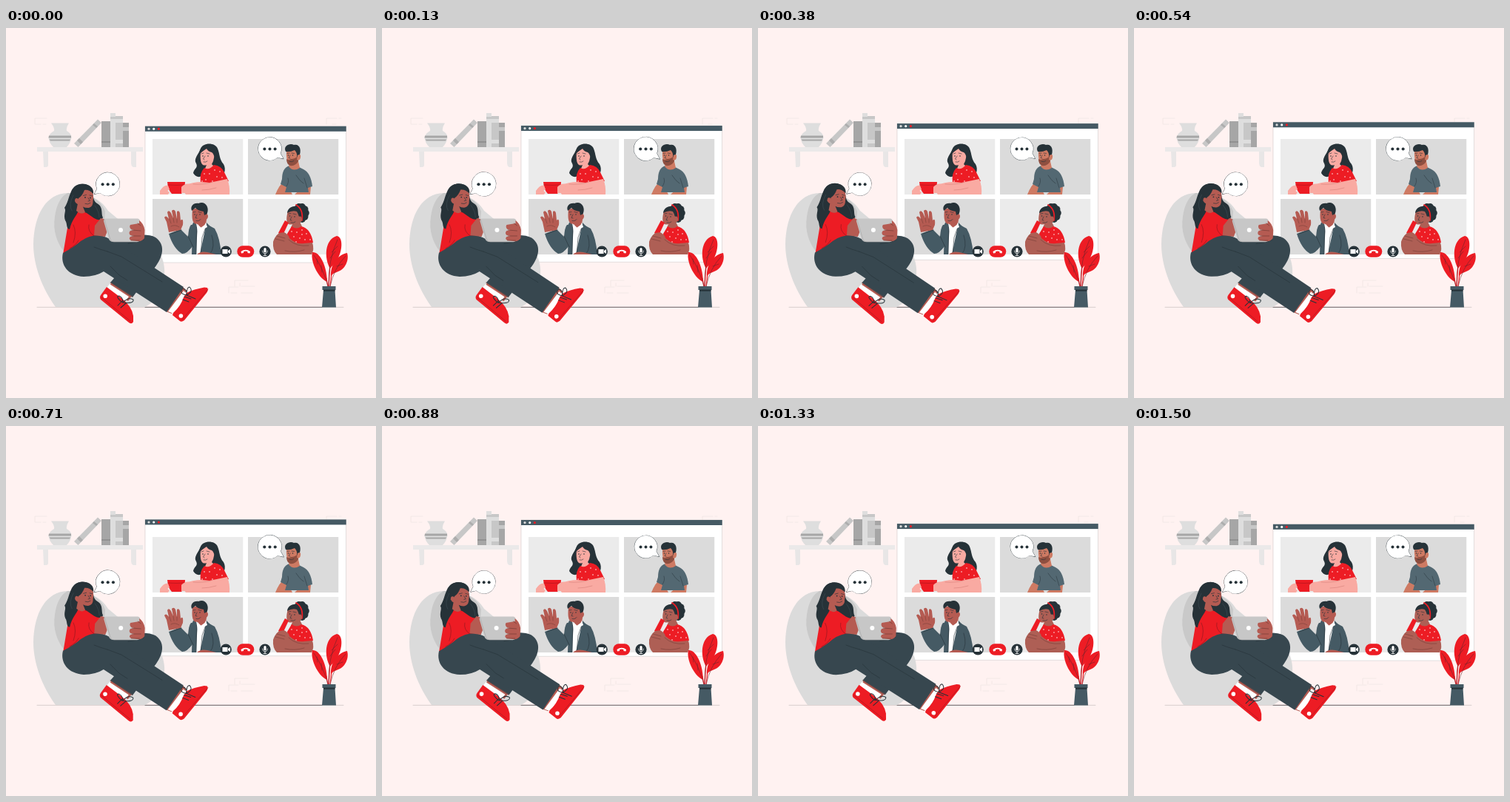
These frames come from a looping animation (500 px wide and 500 px high, 1.54 s). An HTML page with a canvas:

```html
<!DOCTYPE html>
<html lang="en">
<head>
<meta charset="utf-8">
<title>Video call</title>
<style>
html, body { margin: 0; width: 100%; height: 100%; overflow: hidden; background: #fff2f1; }
canvas { display: block; width: 100vw; height: 100vh; }
</style>
</head>
<body>
<canvas></canvas>
<script>
const LOOP = 1540;
const INK = '#263238', SLATE = '#455a64', PANTS = '#37474f', RED = '#ed1c24', WHITE = '#fff';
const SKIN = '#b55b52', PINK = '#f9aaa2', TAN = '#ce7a63', DEEP = '#ae5f55', CREASE = '#713a34';
const canvas = document.querySelector('canvas');
const ctx = canvas.getContext('2d');
const ratio = window.devicePixelRatio || 1;
canvas.width = canvas.height = 500 * ratio;

const paths = new Map();
function path(d) {
  if (!paths.has(d)) paths.set(d, new Path2D(d));
  return paths.get(d);
}
function fill(d, color) {
  ctx.fillStyle = color;
  ctx.fill(path(d));
}
function line(d, color = INK, width = 0.7) {
  ctx.strokeStyle = color;
  ctx.lineWidth = width;
  ctx.stroke(path(d));
}
function box(x, y, w, h, color) {
  ctx.fillStyle = color;
  ctx.fillRect(x, y, w, h);
}
function dot(x, y, r, color) {
  ctx.fillStyle = color;
  ctx.beginPath();
  ctx.arc(x, y, r, 0, Math.PI * 2);
  ctx.fill();
}
function at(x, y, draw, angle = 0, px = 0, py = 0) {
  ctx.save();
  ctx.translate(px + x, py + y);
  ctx.rotate(angle);
  ctx.translate(-px, -py);
  draw();
  ctx.restore();
}
function pane(x, y, color, draw) {
  ctx.save();
  ctx.beginPath();
  ctx.rect(x, y, 122.5, 75);
  ctx.clip();
  box(x, y, 122.5, 75, color);
  draw();
  ctx.restore();
}
function speckle(points) {
  for (const [x, y] of points) dot(x, y, 0.75, WHITE);
}

function backdrop() {
  box(0, 0, 500, 500, '#fff2f1');
  line('M55 122H39V130H47 M50 130H54 M433 130V122H447 M450 122H453 M441 130H446', '#efe5e4', 0.8);
  line('M309 349V341H327 M318 349H336 M301 358V350H314 M304 358H312 M318 358H333 M316 345V349', '#efe5e4', 0.8);
  line('M42 377.3H456', '#b9b2b2', 0.6);
  line('M188 377.3H427', '#514f51', 0.8);
}

function shelf() {
  fill('M50 166H57V185Q57 188 54 188H51Z M169 166H176V188H172Q169 187 169 182Z', '#e8e6e6');
  box(42, 161, 143, 6, '#ebe9e9');
  fill('M61 128.5H85Q81 135 82 139Q88 142 88.5 148Q87 156 82 161H64Q58 155 57.5 148Q59 142 65 139Q66 135 61 128.5Z', '#dedede');
  fill('M58 145.5H88L88 148.5H57.5Z M58.5 150.5H87L86 152.5H60Z', '#a6a6a6');
  fill('M92 156L124 123.5L129 128L97.5 161Z', '#c7c7c7');
  fill('M96 152L99 149L104 154L101 157Z M117 131L119 129L124 133L122 135Z', '#adadad');
  box(129, 126, 12, 35, '#a6a6a6');
  box(141, 115, 7, 46, '#dedede');
  box(148, 119, 10, 42, '#c7c7c7');
  box(158, 128, 8, 33, '#a6a6a6');
  box(141, 120, 7, 3, '#c7c7c7');
  box(148, 123, 10, 5, '#dedede');
  box(148, 151, 10, 5, '#dedede');
  box(158, 134, 8, 5, '#c7c7c7');
  box(129, 153, 12, 2, '#919191');
}

function browser(lift) {
  const y = 132.8 - lift;
  box(188.3, y, 271.2, 184.3, WHITE);
  ctx.strokeStyle = '#cfcccc';
  ctx.lineWidth = 0.6;
  ctx.strokeRect(188.3, y, 271.2, 184.3);
  box(188, y, 271.7, 7, SLATE);
  ['#dbdbdb', WHITE, RED].forEach((c, i) => dot(193 + i * 6.7, y + 3.6, 1.6, c));
}

function bowlWoman() {
  fill('M263 163C266 155 282 154 286 163C289 170 288 177 294 184C298 191 295 200 288 205L267 195C265 204 256 202 253 196C254 190 260 189 257 183C253 177 260 171 263 163Z', INK);
  fill('M263 167Q268 161 278 164L282 171L280 180L278 184L283 189Q276 196 269 190L271 185C263 188 262 178 263 167Z', PINK);
  fill('M261 171C261 159 274 153 282 160Q288 170 282 177Q281 170 278 168Q273 167 271 163Q266 166 261 171Z', INK);
  fill('M268 189Q274 193 281 185Q291 186 295 195L301 207L277 212L263 210Q261 196 268 189Z', RED);
  fill('M275 209L299 204Q303 214 302 225H243Q238 220 241 213Q252 208 264 208Z', PINK);
  line('M277 209Q267 212 253 211M265 219Q274 219 284 216', '#cf7771', 0.5);
  fill('M218 208H242Q242 219 237 224H224Q219 219 218 208Z', RED);
  line('M219 212Q230 213 241 212', '#a9141b', 0.6);
  fill('M208 220Q214 211 219 213L221 218Q216 220 221 222L219 225H208Z', PINK);
  fill('M237 215Q242 209 249 211L247 216L246 218L245 223H237Z', PINK);
  speckle([[268, 197], [275, 197], [282, 192], [289, 194], [285, 201], [270, 205], [279, 207], [292, 202], [265, 207]]);
  dot(266, 173, 0.8, INK);
  dot(273, 173, 0.8, INK);
  line('M264 170L267 169M271 169L275 170M269 173L266.5 177L268 178M267 181Q270 182 272 180', INK, 0.6);
}

function beardMan() {
  fill('M364 225Q369 212 377 206L387 225Z M403 213L412 215L411 225H390Z', TAN);
  fill('M383 186Q373 189 373 204L371 211L379 215L377 222H409L408 216L414 214Q412 196 402 191L394 187Z', '#536872');
  line('M379 214Q383 208 381 203M403 203L407 216M392 199Q397 207 402 210', INK, 0.5);
  fill('M379 166Q387 161 396 168L395 180L397 189Q388 195 382 187L383 184Q378 180 379 166Z', TAN);
  fill('M379 177Q382 179 385 177Q391 177 394 173L395 180Q391 187 384 186Q379 184 379 177Z', '#8f4f40');
  fill('M378 167C374 159 384 155 389 158C397 156 400 165 396 174L393 174Q394 169 390 165Q384 168 378 167Z', INK);
  fill('M394 172Q399 169 398 175Q397 180 393 178Z', TAN);
  dot(381.5, 172, 0.75, INK);
  dot(387.5, 172, 0.75, INK);
  line('M380 169.5L383 169M386 169L389.5 169.5M384 172L382 175.5L384 176M383 180.5Q387 181.5 389 179.5', INK, 0.6);
}

function wavingMan() {
  fill('M250 266Q247 269 246 282L236 272L220 278Q226 298 238 305Q245 305 252 295L253 306H291Q289 283 282 271L269 264Z', SLATE);
  fill('M220 276L217 262L214 256Q216 252 220 258L218 249Q220 245 223 250L226 257L224 247Q227 244 229 248L231 258L231 248Q234 246 235 250L236 260Q240 256 239 266L236 273Z', SKIN);
  line('M221 258L223 264M226 257L227 263M231 258V263M223 268Q228 265 234 269', CREASE, 0.5);
  fill('M258 262L271 264L268 280L264 306H253L257 279Z', WHITE);
  fill('M253 263L259 261L257 306H251Q252 285 250 270Z M271 263L278 270Q270 284 266 306H262Z', SLATE);
  line('M258 266Q257 286 257 306M271 266L265 283L263 306M278 280Q283 296 276 305M246 281L253 296M237 273L223 278', INK, 0.6);
  fill('M252 245Q261 241 272 247L271 259L270 265L263 270L259 265C251 266 251 255 252 245Z', SKIN);
  fill('M251 247C248 239 256 236 260 237C269 233 275 242 272 250L270 254L268 253L267 248Q259 247 256 243Z', INK);
  fill('M268 253Q273 249 273 255Q272 260 268 259Z', SKIN);
  fill('M257 264L264 270L259 275Z M270 263L272 269L265 273Z', WHITE);
  fill('M258 306Q263 301 272 303L284 306Z', SKIN);
  dot(255, 252, 0.75, INK);
  dot(262, 252, 0.75, INK);
  line('M253 249L256 248.5M260 248.5L264 249.5M258 252L256 256.5L258 257M257 260.5Q261 261.5 263 258.5', INK, 0.6);
}

function curlyWoman() {
  for (let i = 0; i < 10; i++) {
    const a = i * Math.PI / 5;
    dot(398 + 7 * Math.cos(a), 250 + 8.5 * Math.sin(a), 4.8, INK);
  }
  box(393, 243, 10, 14, INK);
  fill('M381 247Q388 242 395 248L397 262L400 268Q392 276 385 270L387 265C378 268 378 258 381 247Z', DEEP);
  fill('M380 250C381 241 392 237 398 246Q401 258 397 263Q397 254 393 248Q387 246 380 250Z', INK);
  line('M392 239Q402 245 400 260', RED, 1.8);
  fill('M395 255Q400 253 400 259Q399 264 395 262Z', DEEP);
  fill('M386 268Q393 273 399 268Q412 271 415 290L403 293L381 291L380 278Z', RED);
  speckle([[386, 275], [393, 276], [400, 273], [406, 278], [389, 282], [397, 284], [404, 286], [411, 286], [385, 287], [392, 289], [400, 279]]);
  fill('M377 260L382 263L374 280L368 277Z', RED);
  fill('M403 291L414 290Q417 299 413 306H366Q360 300 361 289Q363 282 369 277L376 276Q382 279 383 284Q393 293 403 291Z', DEEP);
  line('M366 281L377 284M364 285L376 288M382 286Q392 296 409 294M377 301Q390 304 403 300', CREASE, 0.55);
  dot(383.5, 254, 0.75, INK);
  dot(390, 255, 0.75, INK);
  line('M382 251L385 250.5M388 251L392 252M386 255L384 259.5L386 260M385 263Q389 264 391 262', INK, 0.6);
}

function controls() {
  dot(297.2, 302, 7.6, INK);
  fill('M292.5 299H299.5V305H292.5Z M300 301L303 299V305L300 303Z', WHITE);
  ctx.fillStyle = RED;
  ctx.beginPath();
  ctx.roundRect(312.3, 294.3, 23, 15.4, 7.7);
  ctx.fill();
  fill('M317.5 302Q324 297.5 330 302L329.5 304.5L326.5 304L326.4 302Q324 301.2 321.2 302L321 304L318 304.5Z', WHITE);
  dot(350, 302, 7.6, INK);
  line('M350 298.5V302', WHITE, 3.2);
  line('M346.8 301Q347 305 350 305Q353 305 353.2 301M350 305V307.5M348 307.5H352', WHITE, 0.8);
}

function chair() {
  fill('M67 377C49 352 37 321 37 292C38 252 54 224 83 223C109 223 127 229 138 247L180 282C207 291 216 315 214 334C211 356 202 370 188 377Z', '#dbdbdb');
  fill('M83 223C109 223 127 229 134 248L130 300L84 309C68 292 63 273 66 255C68 239 74 228 83 223Z', '#c9c9c9');
}

function shoes() {
  fill('M143 343L171 361L165 369L137 354Z M239 350L244 355L224 386L216 383Z', SKIN);
  fill('M140 346L166 363L160 371L134 354Z M240 355L245 360L229 387L219 383Z', WHITE);
  fill('M136 350L156 365Q170 376 172 389L172 397Q170 401 166 398L128 367Q126 364 128 361Z', RED);
  fill('M226 385Q236 376 240 364L244 358Q254 353 268 350.5L272 351Q274 354 271 358L241 395Q237 398 235 396L225 388Z', RED);
  line('M129 364L168 396M273 353L238 394', '#a3161d', 0.6);
  dot(134.2, 362.2, 2.8, WHITE);
  dot(236.4, 389, 2.8, WHITE);
  line('M151 375L158 368M155 378L162 372M157 371Q147 362 153 362Q158 364 158 371Q165 363 172 367Q173 373 158 371', INK, 1);
  line('M241 363L250 366M239 367L247 370M244 361Q233 359 239 352Q245 353 244 361Q244 350 248 350Q254 356 244 361M244 361L256 366', INK, 1);
}

function legs() {
  shoes();
  fill('M134 286C158 283 188 275 202 283C215 292 213 307 203 321L171 364L141 344L166 315L133 301Z', PANTS);
  line('M141 344L171 363', '#8b4a40', 0.7);
  fill('M77 304Q92 296 101 288Q112 280 126 280Q136 282 147 289L240 350L217 384L132 329Q121 336 105 336C84 335 73 320 77 304Z', PANTS);
  line('M137 302L156 309L211 343M137 302Q126 299 119 296M165 291Q176 290 186 286M141 322L153 334L164 341', INK, 0.6);
}

function torso() {
  fill('M97 247Q87 250 84 264L77 306L104 292L126 284L122 270L134 262Q124 248 108 248Z', RED);
  line('M91 266Q96 276 91 290M112 266Q110 275 119 281M86 298Q94 294 98 287', '#8f1820', 0.65);
}

function head() {
  fill('M88 221C93 208 112 207 116 219C119 228 117 233 123 237C132 242 128 250 131 256Q128 262 119 257L109 250L98 246C96 254 89 258 86 272C81 272 83 263 80 260C77 252 82 247 79 243C84 235 84 230 88 221Z', INK);
  fill('M97 222Q106 215 116 220Q119 226 117.5 234Q118 241 112 243Q107 243.5 104 241.5L107 249Q101 253 95 247L97 237Q92 236 93 230Z', SKIN);
  fill('M90 237C84 218 95 210 104 211C114 211 119 217 118 224Q112 218 106 219Q103 227 98 230L97 237Z', INK);
  fill('M98 231Q93 228 93 234Q95 239 100 238Z', SKIN);
  dot(107, 229, 0.9, INK);
  dot(114, 229.5, 0.9, INK);
  line('M104.5 226.5L108.5 225.5M113 226L116.5 227M111 229.5L113.5 233.5L111 234M107 237.5Q111 239 114 236.5', INK, 0.65);
  line('M91 226Q84 239 89 247M120 240Q126 248 126 256', '#43535b', 0.5);
}

function tablet() {
  fill('M120 267L128 257L135 259L138 272L134 282L119 280Z', SKIN);
  fill('M134 257.5H178Q181 258 181 261L182 285Q181 289 177 289H144Q140 288 139 285L132 261Q132 258 134 257.5Z', '#c7c7c7');
  line('M133 259L141 286Q142 289 146 289H177', '#a5a5a5', 0.6);
  dot(155, 273, 3, WHITE);
  fill('M180 260Q186 264 187.5 273L187 284Q184 289 177 288L169 287Q165 285 168 282L173 281L168 280Q165 277 168 274L173 273L169 272Q166 269 168 266L180 264Z', SKIN);
  line('M170 273L182 274M170 281L182 281M169 287L180 287M178 264L182 267', CREASE, 0.65);
}

function bubble(x, y, r, side, scale) {
  ctx.save();
  ctx.translate(x, y);
  ctx.scale(scale * side, scale);
  ctx.strokeStyle = INK;
  ctx.fillStyle = WHITE;
  ctx.lineWidth = 0.8;
  ctx.beginPath();
  ctx.arc(0, 0, r, 0.85, 0.4 + Math.PI * 2);
  ctx.lineTo(18, 13);
  ctx.closePath();
  ctx.stroke();
  ctx.fill();
  for (const dx of [-7, 0, 7]) dot(dx, 0.2, 2, INK);
  ctx.restore();
}

function plant() {
  line('M433 338L435 349M438 320L436 349M440 332L438 349', RED, 1.2);
  fill('M434 343C420 337 411 313 414 303C423 302 433 318 434 343Z', RED);
  fill('M438 325C430 312 430 286 447 281C456 282 455 302 447 314C443 320 440 322 438 325Z', RED);
  fill('M439 336C438 319 449 306 461 304C464 314 458 326 449 329C444 331 441 332 439 336Z', RED);
  line('M416 307Q429 325 435 349M448 286Q435 314 436 349M459 308Q443 325 438 349M421 319L420 312M427 330L426 321M438 311L445 302M440 303L448 295M447 322L455 319', '#6f242a', 0.6);
  fill('M427.5 349H445.5V354H444.5L446 377.5H427L429 354H427.5Z', SLATE);
  box(429, 353.5, 15.5, 2.2, INK);
}

function render(now) {
  const turn = now % LOOP / LOOP * Math.PI * 2;
  const sway = Math.sin(turn);
  const pulse = 1.015 + 0.025 * Math.sin(turn * 3);
  ctx.setTransform(ratio, 0, 0, ratio, 0, 0);
  ctx.lineCap = ctx.lineJoin = 'round';
  backdrop();
  shelf();
  browser(3.2 * (1 - Math.cos(turn + 0.17)));
  pane(198, 150, '#ebebeb', bowlWoman);
  pane(327, 150, '#dbdbdb', beardMan);
  pane(198, 231, '#dbdbdb', wavingMan);
  pane(327, 231, '#ebebeb', curlyWoman);
  controls();
  chair();
  at(0.3 * sway, -0.4 * sway, torso);
  at(0.5 * sway, -0.8 * sway, head);
  at(0, 0, legs, 0.014 * sway, 120, 300);
  at(0.9 * sway, 0, tablet);
  bubble(137.7, 211, 15.6, -1, pulse);
  bubble(356.5, 163.3, 15.4, 1, pulse);
  plant();
  requestAnimationFrame(render);
}
requestAnimationFrame(render);
</script>
</body>
</html>
```
